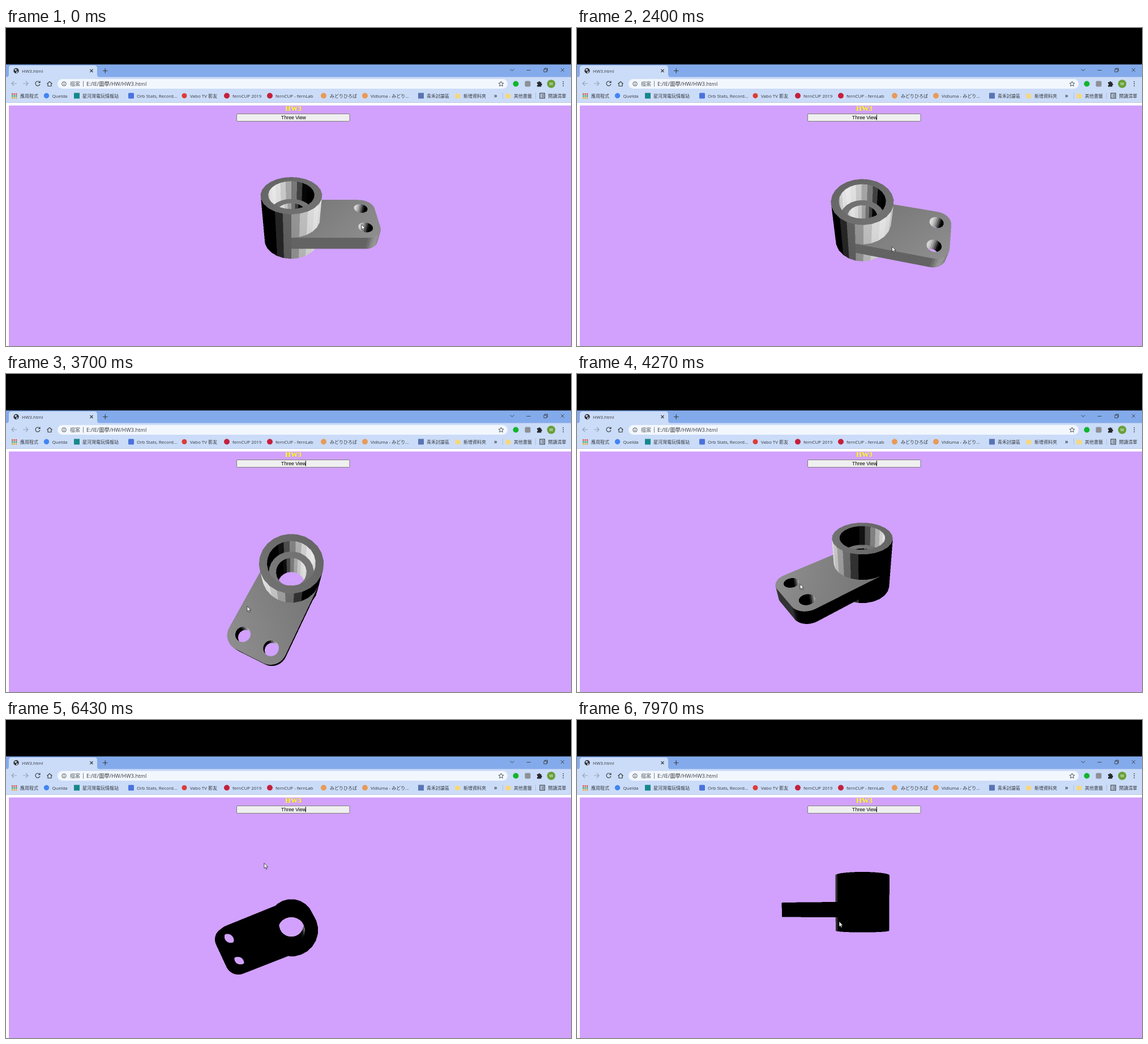
These frames come from a looping animation (998 by 561 pixels, 8000 ms). An HTML page with a canvas:

```html
<!DOCTYPE html>
<html lang="zh-Hant">
<head>
<meta charset="utf-8">
<title>HW3</title>
<style>
  html, body { margin: 0; width: 100%; height: 100%; overflow: hidden; background: #d1a1fd; }
  svg, canvas { position: absolute; left: 0; top: 0; }
  canvas { left: 340px; top: 250px; width: 340px; height: 290px; }
  .ui { font: 8px "Open Sans", "Noto Sans CJK TC", "Noto Sans CJK", sans-serif; fill: #35383d; }
  .line { fill: none; stroke: #3c4043; stroke-width: 1.2; }
  .dim { stroke: #97a3b8; }
</style>
</head>
<body>
<svg width="998" height="561" viewBox="0 0 998 561">
  <rect width="998" height="65" fill="#000"/>
  <rect y="64.300" width="998" height="23" fill="#83aaea"/>
  <path d="M0 87q5 0 5-5v-11q0-5 5-5h146q5 0 5 5v11q0 5 5 5z" fill="#cbdcf8"/>
  <rect y="86.500" width="998" height="45.500" fill="#cbdcf8"/>
  <rect y="131" width="998" height="1" fill="#b9c7df"/>
  <rect y="132" width="998" height="4.700" fill="#fff"/>
  <rect y="132" width="5" height="429" fill="#fff"/>
  <rect x="91" y="90" width="795" height="17" rx="8.500" fill="#f2f7fe"/>

  <g class="ui">
    <circle cx="18" cy="75.500" r="4.700" fill="#303338"/>
    <path d="M14.500 74l3-2 2 2-2 2zM18 77l3-1-1 3-2 .5z" fill="#cbdcf8"/>
    <text x="28" y="79">HW3.html</text>
    <path class="line" d="M148.500 73l5 5m0-5l-5 5M171 75.500h8.500m-4.250-4.250v8.500" stroke="#202124"/>
    <path class="line" style="stroke-width:.9" d="M890.500 72.500l3.500 3 3.500-3M919.500 74.500h7M980 71l6 6m0-6l-6 6M950 72.500h5v5h-5zM951.500 72.500v-1.500h5v5h-1.500"/>

    <path class="line dim" d="M19 98h-9m4-4l-4 4 4 4M30 98h9m-4-4l4 4-4 4"/>
    <path class="line" d="M59.500 96a4 4 0 1 0 .4 3M60 93.500v3h-3M72.500 98.500l4.500-4 4.500 4M74 97.500v5h6v-5"/>
    <circle class="line" cx="102.500" cy="98.500" r="3.700" style="stroke-width:.9"/>
    <path class="line" style="stroke-width:1" d="M102.500 98v2.500m0-4.200v1"/>
    <text x="113" y="102" style="font-size:9px;fill:#62676e">檔案</text>
    <path d="M136.500 93.500v10" stroke="#7b828c"/>
    <text x="142" y="102" style="font-size:9.300px">E:/IE/圖學/HW/HW3.html</text>
    <path class="line" style="stroke-width:.9" d="M874.500 94l1.300 3 3.200.3-2.400 2.100.7 3.200-2.800-1.700-2.800 1.700.7-3.200-2.400-2.100 3.200-.3z"/>
    <circle cx="900.500" cy="98.500" r="5" fill="#12b52d"/>
    <rect x="916.500" y="93.500" width="10" height="10" rx="2" fill="#8d9096"/>
    <path d="M938 95.500h2.500a1.500 1.500 0 1 1 3 0h2v2.500a1.500 1.500 0 1 1 0 3v2.500h-7.500v-2.500a1.500 1.500 0 1 0 0-3z" fill="#25282c"/>
    <circle cx="963" cy="98.500" r="7.300" fill="#689f38"/>
    <text x="963" y="101" text-anchor="middle" style="font-size:7px;fill:#fff">W</text>
    <path d="M983.500 94h1.600v1.600h-1.600zm0 3.600h1.600v1.600h-1.600zm0 3.600h1.600v1.600h-1.600z" fill="#303338"/>

    <g stroke-width="2.300" stroke-dasharray="2.300 1.200">
      <path d="M10 116.500h9.300" stroke="#e3483b"/><path d="M10 120h9.300" stroke="#3f9f58"/><path d="M10 123.500h9.300" stroke="#e9a52b"/>
    </g>
    <text x="25" y="122.500">應用程式</text>
    <circle cx="71.500" cy="119.500" r="4.700" fill="#4285f4"/>
    <text x="81.500" y="122.500">Quelda</text>
    <rect x="120" y="114.500" width="10" height="10" fill="#15888c"/>
    <text x="135" y="122.500">星河灣電玩情報站</text>
    <rect x="216" y="114.500" width="10" height="10" rx="1.500" fill="#4a72dd"/>
    <text x="231" y="122.500">Orb Stats, Record...</text>
    <circle cx="315" cy="119.500" r="4.500" fill="#dc3d35"/>
    <text x="325" y="122.500">Vabo TV 影友</text>
    <circle cx="390" cy="119.500" r="5" fill="#c5203c"/>
    <text x="400" y="122.500">fernCUP 2019</text>
    <circle cx="466" cy="119.500" r="5" fill="#c5203c"/>
    <text x="476" y="122.500">fernCUP - fernLab</text>
    <circle cx="561" cy="119.500" r="5" fill="#e89a58"/>
    <text x="572" y="122.500">みどりひろば</text>
    <circle cx="634" cy="119.500" r="5" fill="#e89a58"/>
    <text x="644" y="122.500">Vidluma - みどり...</text>
    <rect x="728" y="114.500" width="10" height="10" fill="#5974b4"/>
    <text x="743" y="122.500">青禾討論區</text>
    <path id="folder" d="M793.500 115.500h3.500l1.200 1.300h4.300v7.200h-9z" fill="#f6d77b"/>
    <text x="808" y="122.500">新增資料夾</text>
    <text x="862" y="122.500" style="font-size:10px;font-weight:600">»</text>
    <path d="M877.500 114v11M935.500 114v11" stroke="#aebfdb"/>
    <use href="#folder" x="89"/>
    <text x="897" y="122.500">其他書籤</text>
    <path class="line" d="M943 115.200h8.500v8.600H943zM945 117.500h1m1 0h3M945 119.500h1m1 0h3M945 121.500h1m1 0h3"/>
    <text x="957.500" y="122.500">閱讀清單</text>
  </g>

  <text x="507.500" y="146" text-anchor="middle" fill="#ff0" style="font:bold 12.700px 'Liberation Serif',serif">HW3</text>
  <rect x="407.500" y="151.500" width="199.500" height="13" rx="1.500" fill="#efefef" stroke="#767676" stroke-width=".9"/>
  <text x="508" y="160.700" text-anchor="middle" style="font:8.700px 'Liberation Sans',sans-serif">Three View</text>
  <rect id="caret" x="528.800" y="153" width="1" height="9.500"/>
</svg>
<canvas id="view" width="680" height="580"></canvas>
<svg width="998" height="561" viewBox="0 0 998 561">
  <path id="pointer" d="M0 0v9.300l2.100-1.900 1.500 3.300 1.600-.7-1.500-3.200h2.900z" fill="#fff" stroke="#222" stroke-width=".8"/>
</svg>

<script>
const LOOP = 8000, PRESS = 1900;
const SCALE = 2, LEFT = 340, TOP = 250;
const CENTER_X = 504, CENTER_Y = 371.5, DIST = 520;
const LIGHT = [530, 385, 400];

// time, pointer x, pointer y, azimuth, elevation
const track = [
  [0, 628, 351, 0, 45], [900, 628, 351, 0, 45], [1900, 574, 376, 0, 45],
  [2400, 556.5, 390, 13, 53.5], [2500, 547, 395, 21, 57.5], [3030, 480, 424, 74, 79],
  [3200, 466, 432, 84, 86], [3400, 453, 433, 95, 86], [3800, 418, 406, 122, 64],
  [4170, 396, 378, 141, 42], [4270, 394, 375, 142, 40], [4380, 394, 375, 142, 40],
  [4900, 535, 407, 142, 40], [5300, 506, 376, 164, 16], [5670, 474, 340, 188.5, -12],
  [6430, 456, 257, 202, -79], [6620, 456, 241, 202, -90], [6850, 456, 240, 202, -90],
  [7500, 460, 296, 199, -47], [7880, 463, 359, 196.6, 3], [8000, 463, 360, 196.6, 3.5]
];

function slope(i, c) {
  if (!i || i === track.length - 1) return 0;
  const rate = k => (track[k + 1][c] - track[k][c]) / (track[k + 1][0] - track[k][0]);
  const a = rate(i - 1), b = rate(i);
  return a * b <= 0 ? 0 : 2 * a * b / (a + b);
}

// monotone cubic interpolation
function sample(t, c) {
  let i = 0;
  while (i < track.length - 2 && t >= track[i + 1][0]) i++;
  const h = track[i + 1][0] - track[i][0], u = (t - track[i][0]) / h, v = 1 - u;
  return track[i][c] * v * v * (1 + 2 * u) + track[i + 1][c] * u * u * (3 - 2 * u)
    + h * u * v * (slope(i, c) * v - slope(i + 1, c) * u);
}

// --- model: a counterbored sleeve with a two-hole plate ---
const R = 47.3, BORE_TOP = 35.5, BORE = 24, HEIGHT = 96, STEP = 60;
const PLATE_LOW = 24, PLATE_HIGH = 49, HOLE_X = 118.3, CORNER = R / 2, HOLE_R = 11.5;
const faces = [];

function arc(cx, cy, r, from, to, n) {
  return Array.from({ length: n + 1 }, (_, i) => {
    const a = (from + (to - from) * i / n) * Math.PI / 180;
    return [cx + r * Math.cos(a), cy + r * Math.sin(a)];
  });
}
const ring = (cx, cy, r, n = 24) => arc(cx, cy, r, 0, 360, n).slice(0, n);

function flat(z, up, ...loops) {
  faces.push({ loops: loops.map(l => l.map(([x, y]) => [x, y, z])), normal: [0, 0, up] });
}

function wall(loop, z0, z1, side, soft) {
  loop.forEach(([x, y], i) => {
    const [x2, y2] = loop[(i + 1) % loop.length], len = Math.hypot(x2 - x, y2 - y);
    if (len < 1e-6) return;
    const normal = [side * (y2 - y) / len, side * (x - x2) / len, 0];
    const face = { loops: [[[x, y, z0], [x2, y2, z0], [x2, y2, z1], [x, y, z1]]], normal };
    if (soft) face.gray = 150 * Math.max(0, Math.cos(Math.atan2(normal[1], normal[0]) - 0.95)) ** 2;
    faces.push(face);
  });
}

const outer = ring(0, 0, R), wide = ring(0, 0, BORE_TOP), narrow = ring(0, 0, BORE);
wall(outer, 0, HEIGHT, 1);
wall(wide, STEP, HEIGHT, -1);
wall(narrow, 0, STEP, -1);
flat(HEIGHT, 1, outer, wide);
flat(STEP, 1, wide, narrow);
flat(0, -1, outer, narrow);

const plate = [[0, -R], ...arc(HOLE_X, -CORNER, CORNER, -90, 0, 9),
  ...arc(HOLE_X, CORNER, CORNER, 0, 90, 9), [0, R], ...arc(0, 0, 42, 90, -90, 12)];
const holes = [-CORNER, CORNER].map(y => ring(HOLE_X, y, HOLE_R));
wall(plate, PLATE_LOW, PLATE_HIGH, 1, true);
holes.forEach(h => wall(h, PLATE_LOW, PLATE_HIGH, -1));
flat(PLATE_HIGH, 1, plate, ...holes);
flat(PLATE_LOW, -1, plate, ...holes);

// --- depth-buffered scanline renderer ---
const canvas = document.getElementById('view'), ctx = canvas.getContext('2d');
const W = canvas.width, H = canvas.height;
const image = ctx.createImageData(W, H), pixels = new Uint32Array(image.data.buffer);
const nearness = new Float32Array(W * H);
const midX = (CENTER_X - LEFT) * SCALE, midY = (CENTER_Y - TOP) * SCALE, focal = DIST * SCALE;

function render(azimuth, elevation) {
  const a = azimuth * Math.PI / 180, e = elevation * Math.PI / 180;
  const ca = Math.cos(a), sa = Math.sin(a), ce = Math.cos(e), se = Math.sin(e);
  const turn = ([x, y, z]) => {
    const toward = x * sa + y * ca;
    return [x * ca - y * sa, z * ce - toward * se, -z * se - toward * ce];
  };
  pixels.fill(0);
  nearness.fill(0);

  for (const { loops, normal, gray } of faces) {
    const [nx, ny, nz] = normal, [nr, nu, nd] = turn(normal);
    const first = turn(loops[0][0]);
    const c = nr * first[0] + nu * first[1] + nd * (first[2] + DIST);
    if (c >= -1e-6) continue;

    const edges = [];
    let low = H, high = 0;
    for (const loop of loops) {
      const pts = loop.map(p => {
        const [r, u, d] = turn(p), k = focal / (d + DIST);
        return [midX + r * k, midY - u * k];
      });
      pts.forEach((p, i) => {
        edges.push([p, pts[(i + 1) % pts.length]]);
        low = Math.min(low, p[1]);
        high = Math.max(high, p[1]);
      });
    }

    for (let row = Math.max(0, Math.floor(low)); row < Math.min(H, high); row++) {
      const y = row + 0.5, cuts = [];
      for (const [p, q] of edges)
        if ((p[1] <= y) !== (q[1] <= y))
          cuts.push(p[0] + (y - p[1]) * (q[0] - p[0]) / (q[1] - p[1]));
      cuts.sort((m, n) => m - n);
      const Y = (midY - y) / focal;
      for (let k = 0; k + 1 < cuts.length; k += 2) {
        const end = Math.min(W, Math.ceil(cuts[k + 1] - 0.5));
        for (let col = Math.max(0, Math.ceil(cuts[k] - 0.5)); col < end; col++) {
          const X = (col + 0.5 - midX) / focal, near = (nr * X + nu * Y + nd) / c;
          const at = row * W + col;
          if (near <= nearness[at]) continue;
          nearness[at] = near;
          let tone = gray;
          if (tone === undefined) {
            const w = 1 / near, right = X * w, up = Y * w, t = DIST - w;
            const toward = t * ce - up * se;
            const lx = LIGHT[0] - right * ca - toward * sa;
            const ly = LIGHT[1] + right * sa - toward * ca;
            const lz = LIGHT[2] - t * se - up * ce;
            tone = 255 * Math.max(0, nx * lx + ny * ly + nz * lz) / Math.sqrt(lx * lx + ly * ly + lz * lz);
          }
          pixels[at] = 0xff000000 | Math.round(tone) * 0x10101;
        }
      }
    }
  }
  ctx.putImageData(image, 0, 0);
}

const pointer = document.getElementById('pointer'), caret = document.getElementById('caret');
const start = performance.now();

function frame() {
  const t = (performance.now() - start) % LOOP;
  pointer.setAttribute('transform', `translate(${sample(t, 1)} ${sample(t, 2) - 4.5})`);
  caret.style.visibility = t >= PRESS ? 'visible' : 'hidden';
  render(sample(t, 3), sample(t, 4));
  requestAnimationFrame(frame);
}
frame();
</script>
</body>
</html>
```
